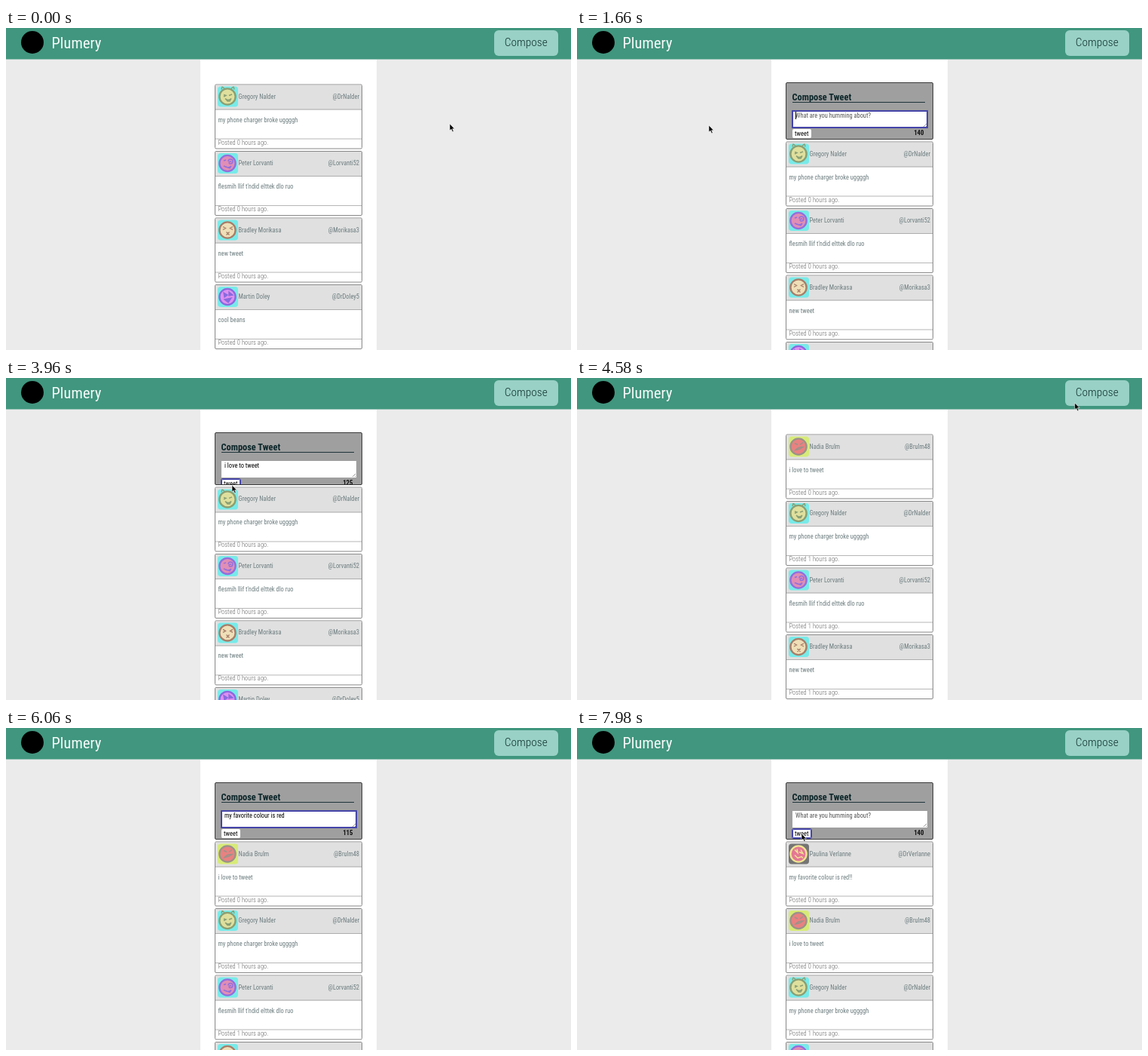
An HTML page for the animation above (8000 ms loop, 750 by 427 pixels).

```html
<!DOCTYPE html>
<html lang="en">
<head>
<meta charset="utf-8">
<title>Feed</title>
<style>
html, body { margin: 0; width: 100%; height: 100%; overflow: hidden; }
#stage { position: relative; width: 750px; height: 427px; overflow: hidden; background: #ebebeb;
  font: 400 8.4px/10px "Roboto Condensed", Roboto, sans-serif; font-stretch: 75%; color: #0c2629; white-space: pre; }
#stage * { position: absolute; box-sizing: border-box; }
#column { left: 258px; top: 41px; width: 234px; height: 386px; background: #fff; }
#header { left: 0; top: 0; width: 750px; height: 42px; background: #40967e; border-bottom: 1px solid #95c0b5;
  background-clip: padding-box; }
#logo { left: 20px; top: 4px; width: 30px; height: 30px; border-radius: 50%; background: #000; }
#brand { left: 60.5px; top: 8px; font-size: 20.5px; line-height: 24px; color: #f4faf8; }
#open { left: 647.5px; top: 3px; width: 85.5px; height: 33.5px; border-radius: 6px; background: #99d1c6;
  font-size: 15.4px; font-weight: 300; line-height: 33px; text-align: center; color: #123230; }
.card { left: 276.5px; top: 0; width: 196.5px; height: 86px; border: 1px solid #3a3a3a; border-radius: 2px;
  background: #fff; overflow: hidden; }
.head { left: 0; top: 0; width: 195px; height: 33px; background: #cdcdcd; border-bottom: 1px solid #777; }
.face { left: 3.5px; top: 1.5px; width: 27px; height: 27px; border-radius: 4px; }
.name { left: 31px; top: 10px; }
.handle { right: 3.5px; top: 10px; }
.body { left: 4px; top: 40.7px; }
.foot { left: 0; top: 70.5px; width: 195px; height: 14px; border-top: 1px solid #888; }
.foot span { left: 4px; top: -1px; font-weight: 300; letter-spacing: .1px; color: #000; }
#panel { left: 276.5px; top: 72px; width: 196.5px; border: 1px solid #3a3a3a; border-radius: 2px;
  background: #9f9f9f; overflow: hidden; }
#panel h1 { margin: 0; left: 8px; top: 10.8px; font-size: 12.4px; line-height: 16px; font-weight: 700; }
#rule { left: 8px; top: 25px; width: 176px; height: 1px; background: #1c3338; }
#field { left: 8px; top: 36.5px; width: 179px; height: 22.5px; background: #fff; color: #000; }
#text { left: 4.5px; top: 1.5px; }
#caret { display: inline-block; position: relative !important; width: 1px; height: 10px; margin-right: -1px;
  background: #000; vertical-align: top; }
#grip { right: 1px; bottom: 1px; width: 4px; height: 4px;
  background: linear-gradient(135deg, transparent 50%, #999 50% 62%, transparent 62% 80%, #999 80%); }
#send { left: 8px; top: 61px; width: 25.5px; height: 12px; border-radius: 2px; background: #fff;
  line-height: 12px; text-align: center; color: #000; }
.focus { box-shadow: 0 0 0 1px #4545aa, inset 0 0 0 1px #4545aa; }
#count { right: 11.5px; top: 61px; font-weight: 700; font-size: 8.8px; color: #111; }
#pointer { left: -1px; top: -1.5px; width: 9px; height: 13px; }
</style>
</head>
<body>
<div id="stage">
  <div id="column"></div>
  <div id="header"><i id="logo"></i><span id="brand">Plumery</span><div id="open">Compose</div></div>
  <div id="panel">
    <h1>Compose Tweet</h1><i id="rule"></i>
    <div id="field"><span id="text"></span><i id="grip"></i></div>
    <div id="send">tweet</div><span id="count"></span>
  </div>
  <svg id="pointer" viewBox="0 0 9 13"><path d="M1 1V10L3.1 8.2 4.7 11.8 6.2 11.1 4.7 7.7H7.4Z" fill="#000" stroke="#fff" stroke-width=".6"/></svg>
</div>
<script>
const LOOP = 8000, PITCH = 88.5, SLIDE = 280;
const $ = id => document.getElementById(id);
const stage = $('stage');

const marks = {
  wink: '<path d="M8 11l3 1-3 1.5M15 12l4-1.5M10 16q4 4 8 0l-2 3.5h-3z"/><path d="M5 4l1-4 3 3M18 3l3-3 1 4"/>',
  swirl: '<path d="M8 10l3-1M14 11a3 3 0 1 1 3 3a1.5 1.5 0 1 1 1-2M8 17q6 4 10 0l-2 3z"/>',
  cross: '<path d="M7 9l3.5 2L7 13M20 9l-3.5 2 3.5 2M11.5 16l4 4M15.5 16l-4 4"/>',
  shards: '<path class="f" d="M8 8l5 3-4 3zM15 7l5 4-5 1zM9 17l9-2-4 6z"/>',
  frown: '<path d="M8 9l4 2M15 11l4-3M9 18q3-4 10-4l-4 2.5z"/>',
  slash: '<path d="M8 8l4 4-1-5M16 8l3 5-5-2M8 15l4 4 5-2 2 2"/>'
};

// name, handle, message, backdrop, ring, skin, features
const posts = [
  ['Paulina Verlanne', '@DrVerlanne', 'my favorite colour is red!!', '#1b1b1b', '#e8d34a', '#d21f4e', 'slash'],
  ['Nadia Brulm', '@Brulm48', 'i love to tweet', '#bedf1e', '#5c4a3c', '#da302e', 'frown'],
  ['Gregory Nalder', '@DrNalder', 'my phone charger broke uggggh', '#1edfdc', '#3d6118', '#caca5d', 'wink'],
  ['Peter Lorvanti', '@Lorvanti52', "flesmih llif t'ndid elttek dlo ruo", '#1edfdc', '#4a10c8', '#cc4484', 'swirl'],
  ['Bradley Morikasa', '@Morikasa3', 'new tweet', '#1edfdc', '#6e2a08', '#e6cb89', 'cross'],
  ['Martin Doley', '@DrDoley5', 'cool beans', '#1edfdc', '#3c08cb', '#cb48e6', 'shards']
];

const cards = posts.map(([name, handle, message, back, ring, skin, mark]) => {
  const card = document.createElement('div');
  card.className = 'card';
  card.innerHTML = `<div class="head">
    <svg class="face" viewBox="0 0 27 27" style="background:${back}" fill="none" stroke="${ring}" stroke-width="1.4">
    <circle cx="13" cy="13.5" r="10.6" fill="${skin}" stroke-width="2.4"/>${marks[mark].replace('class="f"', `fill="${ring}"`)}</svg>
    <span class="name">${name}</span><span class="handle">${handle}</span></div>
    <span class="body">${message}</span><div class="foot"><span></span></div>`;
  stage.insertBefore(card, $('header'));
  return card;
});

// time, x, y of the pointer tip
const path = [
  [0, 589, 127], [120, 589, 127], [520, 690, 24], [760, 690, 24], [1500, 175, 129], [3650, 175, 129],
  [3870, 300, 142], [4260, 300, 142], [4650, 690, 24], [4800, 690, 24], [5150, 560, 130],
  [6120, 560, 130], [6320, 299, 136], [6780, 299, 136], [7160, 690, 24], [7380, 690, 24],
  [7820, 298, 140], [8000, 298, 140]
];
const opens = [620, 4700, 7210], closes = [3910, 6345];
const typing = [
  { from: 2595, step: 70, words: posts[1][2], clear: closes[0] + SLIDE },
  { from: 5201, step: 34, words: posts[0][2], clear: closes[1] + SLIDE }
];

const swing = x => .5 - Math.cos(Math.PI * Math.min(1, Math.max(0, x))) / 2;
const slideSum = (times, t) => times.reduce((sum, s) => sum + swing((t - s) / SLIDE), 0);

function pointerAt(t) {
  const i = Math.max(1, path.findIndex(p => p[0] >= t));
  const [t0, x0, y0] = path[i - 1], [t1, x1, y1] = path[i];
  const k = swing((t - t0) / (t1 - t0));
  return [x0 + (x1 - x0) * k, y0 + (y1 - y0) * k];
}

function draw(t) {
  const open = slideSum(opens, t) - slideSum(closes, t);
  const first = 2 - typing.filter(d => t >= d.clear).length;
  const [x, y] = pointerAt(t);
  const draft = typing.find(d => t >= d.from && t < d.clear);
  const typed = draft ? draft.words.slice(0, Math.floor((t - draft.from) / draft.step)) : '';
  const busy = draft && t < draft.from + draft.step * (draft.words.length + .5);

  cards.forEach((card, i) => {
    const top = 74.5 + 76 * open + PITCH * (i - first);
    const over = x > 276 && x < 474 && y > top && y < top + 86 && !busy;
    card.style.display = i < first ? 'none' : '';
    card.style.transform = `translateY(${top}px)`;
    card.style.opacity = over ? 1 : .6;
    card.querySelector('.foot span').textContent = `Posted ${i > 1 && first < 2 ? 1 : 0} hours ago.`;
  });

  const sending = t > 3885 && t < 4300 || t > 6325 && t < 6700 || t > 7850;
  const caret = !sending && (t + 200) % 800 < 500 ? '<i id="caret"></i>' : '';
  $('panel').style.display = open > .001 ? '' : 'none';
  $('panel').style.height = 76 * open + 'px';
  $('text').innerHTML = typed ? typed + caret : caret + 'What are you humming about?';
  $('text').style.color = typed ? '#000' : '#555';
  $('field').className = sending ? '' : 'focus';
  $('send').className = sending ? 'focus' : '';
  $('count').textContent = 140 - typed.length;
  $('pointer').style.display = busy ? 'none' : '';
  $('pointer').style.transform = `translate(${x}px, ${y}px)`;
}

const start = performance.now();
function tick(now) {
  draw(Math.max(0, now - start) % LOOP);
  requestAnimationFrame(tick);
}
draw(0);
requestAnimationFrame(tick);
</script>
</body>
</html>
```
